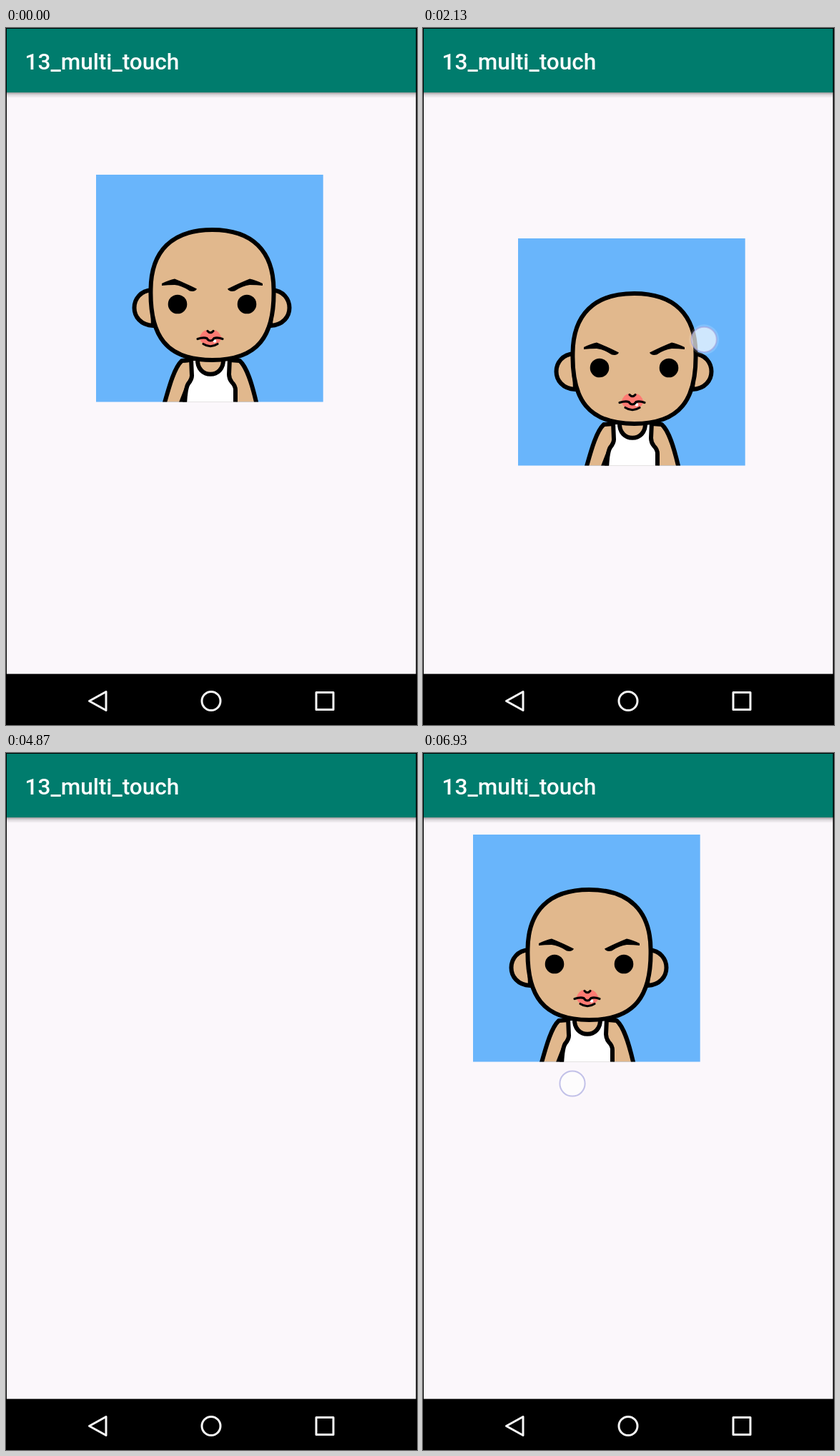
An HTML page for the animation above (7000 ms loop, 575 px wide and 974 px high).

```html
<!DOCTYPE html>
<html lang="en">
<head>
<meta charset="utf-8">
<title>13_multi_touch</title>
<style>
  html, body { margin: 0; width: 100%; height: 100%; overflow: hidden; background: #000; }
  svg { display: block; width: 100%; height: 100%; }
  .ink { stroke: #000; stroke-width: 6; stroke-linejoin: round; stroke-linecap: round; }
  .thin { fill: none; stroke: #000; stroke-width: 3.2; stroke-linecap: round; stroke-linejoin: round; }
  .skin { fill: #e1b88d; }
  .nav { fill: none; stroke: #f7f7f7; stroke-width: 3; stroke-linejoin: round; }
</style>
</head>
<body>
<svg viewBox="0 0 575 974">
  <defs>
    <clipPath id="card"><rect x="126" y="205" width="317.700" height="317.400"/></clipPath>
    <clipPath id="content"><rect x="1" y="90" width="572.500" height="812.600"/></clipPath>
    <linearGradient id="shade" x2="0" y2="1">
      <stop offset="0" stop-color="#000" stop-opacity=".38"/>
      <stop offset=".4" stop-color="#000" stop-opacity=".13"/>
      <stop offset="1" stop-color="#000" stop-opacity="0"/>
    </linearGradient>
    <g id="dot">
      <circle r="21" fill="#fff" opacity=".16"/>
      <circle r="17.600" fill="#fff" fill-opacity=".62" stroke="#a4a4de" stroke-opacity=".65" stroke-width="2"/>
    </g>
  </defs>

  <rect width="575" height="974"/>
  <rect x="1" y="90" width="572.500" height="812.600" fill="#fbf7fb"/>

  <g clip-path="url(#content)">
    <g id="picture">
      <g clip-path="url(#card)">
        <rect x="126" y="205" width="318" height="318" fill="#69b5fb"/>
        <path class="ink skin" d="M221 527C229 498 236 474 246 465Q286 461 327 465C337 474 344 496 351 527Z"/>
        <path class="ink" fill="#fff" d="M259 462L260 486Q260 491 255 497Q251 503 250 527H321V506Q321 500 316 495Q312 490 312 484L313 462Z"/>
        <path d="M251 500L242 523H253Z"/>
        <path class="ink skin" d="M268 462C266 491 306 491 304 462Z"/>
        <path class="ink skin" d="M204 366C172 368 170 414 206 416ZM372 366C404 368 406 414 370 416Z"/>
        <path class="ink skin" d="M288.500 282C232 282 203 312 202.500 365C201 430 224 464 288.500 464C353 464 376 430 374.500 365C374 312 345 282 288.500 282Z"/>
        <circle cx="240" cy="386" r="13.300"/>
        <circle cx="337" cy="386" r="13.300"/>
        <path id="brow" d="M218 357Q228 352 236 350.500Q250 356 267 364.500Q265 369 257 367.500Q246 360 236 359Q226 359 218 360Z"/>
        <use href="#brow" transform="matrix(-1 0 0 1 577 0)"/>
        <path fill="#ff7b73" d="M270 433Q275 422 281 422Q286 427 291 422Q297 422 302 433Q297 445 286 445Q275 445 270 433Z"/>
        <circle cx="292" cy="437.500" r="2.200" fill="#fff"/>
        <path class="thin" d="M268 434.500Q276 432 281 433.500Q283 437 286 437Q289 437 291 433.500Q296 432 303 434.500M282 423.500Q286 428 290 423.500M276 441.500Q286 448 296 441.500"/>
      </g>
    </g>
    <use id="right" href="#dot"/>
    <use id="left" href="#dot"/>
  </g>

  <rect x="1" y="90" width="572.500" height="8" fill="url(#shade)"/>
  <rect x="1" y="1" width="572.500" height="89" fill="#007c6d"/>
  <text x="26.500" y="57.500" font-family="Roboto, sans-serif" font-weight="500" font-size="31.600" fill="#fff">13_multi_touch</text>

  <path class="nav" d="M116.500 940.500L140 927.500V953.500Z"/>
  <circle class="nav" cx="287" cy="940.500" r="13"/>
  <rect class="nav" x="434" y="928.500" width="24" height="24"/>
</svg>
<script>
const LOOP = 7000, FPS = 15;

// Turning points of the drag: seconds, x, y
const drag = [
  [.2, 126, 205], [.95, 145, 290], [1.467, 146, 284], [1.8, 112, 350],
  [2.133, 133, 294], [2.467, 139, 252], [3.2, 125, 423], [3.933, 102, 745],
  [4.5, 94, 960], [5.267, 94, 960], [5.8, 95, 785], [6.933, 70, 114]
];
const leftPress = [[3.2, 187, 536], [3.8, 186, 469], [4.067, 186, 553]];
const leftSwipe = [[5.267, 201, 720], [5.8, 201, 599], [6.933, 209, 462]];
const rightSwipe = [[5.267, 390, 610], [5.8, 393, 474], [6.933, 400, 474]];

const byId = id => document.getElementById(id);
const picture = byId('picture'), right = byId('right'), left = byId('left');
const clamp = v => Math.max(0, Math.min(1, v));

function along(path, t) {
  const i = Math.max(1, path.findIndex(key => key[0] > t));
  const last = path[path.length - 1];
  if (t >= last[0]) return last.slice(1);
  const [t0, x0, y0] = path[i - 1], [t1, x1, y1] = path[i];
  const u = clamp((t - t0) / (t1 - t0));
  return [x0 + (x1 - x0) * u, y0 + (y1 - y0) * u];
}

// While dragging, the finger travels a fraction of the picture's way.
const grip = (x, y, t) => [
  390 + .4 * (x - 125),
  474 + .3 * (y - 423) + 28 * Math.max(0, 2.13 - t)
];

const shown = (t, from, to) => clamp(Math.min(t - from, to - t) / .15);

function place(node, [x, y], opacity) {
  node.setAttribute('transform', `translate(${x} ${y})`);
  node.setAttribute('opacity', opacity);
}

function render(ms) {
  const t = Math.floor((ms % LOOP + 4) * FPS / 1000) / FPS;
  const [x, y] = along(drag, t).map(Math.round);
  place(picture, [x - 126, y - 205], 1);
  if (t < 5) {
    place(right, grip(x, y, t), shown(t, .2, 4.04));
    place(left, along(leftPress, t), shown(t, 3.18, 4.72));
  } else {
    place(right, along(rightSwipe, t), shown(t, 5.2, 6.93));
    place(left, along(leftSwipe, t), shown(t, 5.2, 7.1));
  }
}

const start = performance.now();
function tick() {
  render(performance.now() - start);
  requestAnimationFrame(tick);
}
tick();
</script>
</body>
</html>
```
